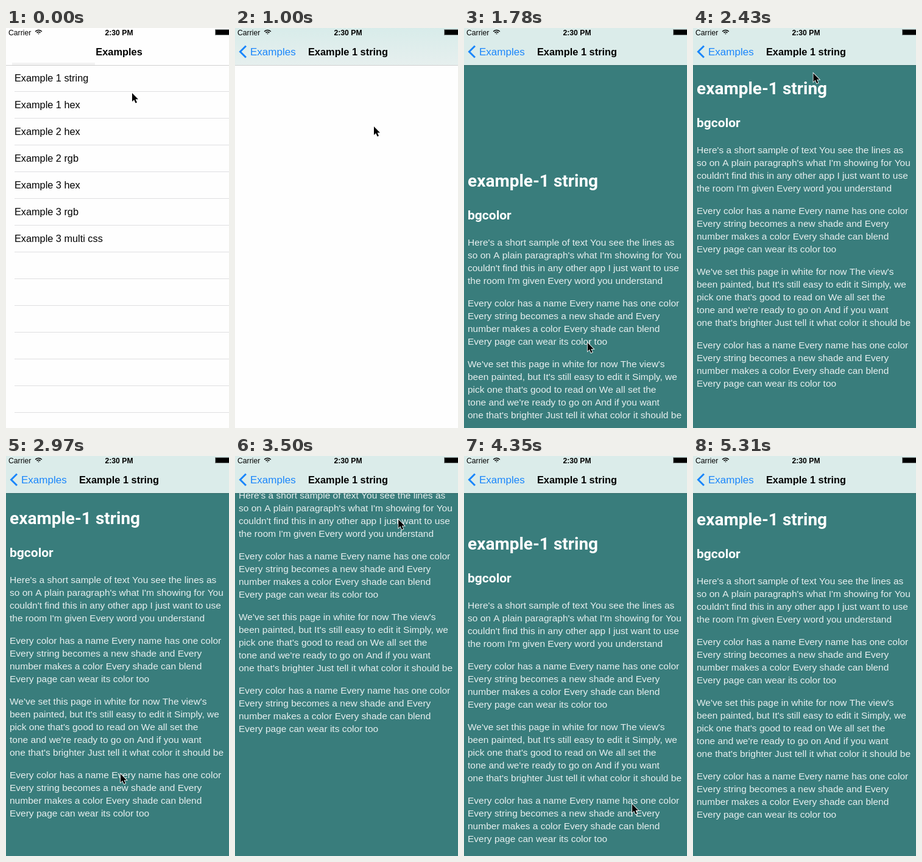
Recreate the animation shown at these times as an HTML page with a canvas. Size 366x658 px, loop 6.98 s.

```html
<!DOCTYPE html>
<html lang="en">
<head>
<meta charset="utf-8">
<title>Examples</title>
<style>
html, body { margin: 0; width: 100%; height: 100%; overflow: hidden; background: #fff; }
canvas { display: block; }
</style>
</head>
<body>
<canvas id="stage" width="366" height="658"></canvas>
<script>
const W = 366, H = 658, NAV = 61, ROW = 44, LOOP = 6980;
const PUSH = 430, PUSHED = 830, LOADED = 1060, RELEASE = 4650, EXIT = 5100;
const ctx = document.getElementById('stage').getContext('2d');
const SANS = '"Liberation Sans", Arial, sans-serif';
const ROBOTO = 'Roboto, "Liberation Sans", sans-serif';
const PAPER = '#fefefe', TEAL = '#397d7c', BLUE = '#1a86fb', MINT = '#dbecea';

const rows = ['Example 1 string', 'Example 1 hex', 'Example 2 hex', 'Example 2 rgb',
  'Example 3 hex', 'Example 3 rgb', 'Example 3 multi css'];

const chorus = ['Every color has a name Every name has one color',
  'Every string becomes a new shade and Every',
  'number makes a color Every shade can blend',
  'Every page can wear its color too'];
const paragraphs = [
  ["Here's a short sample of text You see the lines as",
    "so on A plain paragraph's what I'm showing for You",
    "couldn't find this in any other app I just want to use",
    "the room I'm given Every word you understand"],
  chorus,
  ["We've set this page in white for now The view's",
    "been painted, but It's still easy to edit it Simply, we",
    "pick one that's good to read on We all set the",
    "tone and we're ready to go on And if you want",
    "one that's brighter Just tell it what color it should be"],
  chorus];

const smooth = p => p * p * (3 - 2 * p);
const easeOut = p => 1 - (1 - p) ** 3;
const mix = (a, b, p) => a + (b - a) * p;
const progress = (t, start, end) => Math.max(0, Math.min(1, (t - start) / (end - start)));
const move = (t, start, end, distance, curve = smooth) =>
  distance * curve(progress(t, start, end));

// Two drags down and up, then the page springs back to rest.
function scrollAt(t) {
  return move(t, 1150, 1900, 158) + move(t, 2200, 2500, -188) + move(t, 2500, 2880, 28)
    + move(t, 2970, 3620, -153) + move(t, 3910, 4500, 232)
    + move(t, RELEASE, 5310, -77, easeOut);
}

function pointerAt(t) {
  const x = 207 + move(t, 460, 1000, 21) + move(t, 1150, 1900, -27)
    + move(t, 2200, 2880, -13) + move(t, 2970, 3620, 88);
  const y = 107 + move(t, 50, 230, -13) + move(t, 460, 1000, 68) + move(t, 1000, 1150, -62)
    + move(t, 1150, 1900, 448) + move(t, 2200, 2500, -547) + move(t, 2500, 2880, 522)
    + move(t, 2970, 3620, -459) + move(t, 3910, 4500, 605);
  return [x, y];
}

function rect(x, y, w, h, color) {
  ctx.fillStyle = color;
  ctx.fillRect(x, y, w, h);
}

function text(str, x, y, font, color = '#000', align = 'left', alpha = 1) {
  ctx.globalAlpha = alpha;
  ctx.font = font;
  ctx.fillStyle = color;
  ctx.textAlign = align;
  ctx.fillText(str, x, y);
  ctx.globalAlpha = 1;
}

function widthOf(str, font) {
  ctx.font = font;
  return ctx.measureText(str).width;
}

// Headings use the condensed face where the font offers one.
const hasCondensed = widthOf('example', `condensed 700 32px ${ROBOTO}`)
  < widthOf('example', `700 32px ${ROBOTO}`) - 2;
const heading = (large, small) =>
  hasCondensed ? `condensed 700 ${large}px ${ROBOTO}` : `700 ${small}px ${ROBOTO}`;

function drawList(shift, selected) {
  ctx.save();
  ctx.translate(shift, 0);
  if (selected) rect(0, NAV, W, ROW, '#d9d9d9');
  for (let y = 104; y < H; y += ROW) rect(14, y, W - 14, 1, '#dfdfe1');
  rows.forEach((row, i) => text(row, 14, 88 + ROW * i, `16.3px ${SANS}`));
  ctx.restore();
}

function drawPage(offset) {
  rect(0, NAV, W, H - NAV, TEAL);
  ctx.save();
  ctx.translate(6, Math.round(offset));
  text('example-1 string', 0, 114, heading(32, 28), '#fff');
  text('bgcolor', 0, 168, heading(24, 21), '#fff');
  let y = 211;
  for (const lines of paragraphs) {
    for (const line of lines) {
      text(line, 0, y, `15.5px ${SANS}`, '#fff', 'left', 0.88);
      y += 21;
    }
    y += 16;
  }
  ctx.restore();
}

function drawStatus() {
  text('Carrier', 4, 12, `12.2px ${SANS}`);
  text('2:30 PM', 185.5, 11.5, `bold 12.2px ${SANS}`, '#000', 'center');
  rect(343, 2, W - 343, 10, '#8a9291');
  rect(344, 3, W - 344, 8, '#000');
  ctx.strokeStyle = '#000';
  ctx.lineWidth = 1.6;
  for (let r = 1; r <= 7; r += 3) {
    ctx.beginPath();
    ctx.arc(53.5, 10.5, r, -Math.PI * 0.77, -Math.PI * 0.23);
    ctx.stroke();
  }
}

function drawBar(t, p) {
  rect(0, 0, W, NAV, PAPER);
  if (t >= LOADED) {
    rect(0, 0, W, NAV, MINT);
  } else {
    const tint = ctx.createLinearGradient(0, 0, 0, NAV);
    tint.addColorStop(0, '#d8ecea');
    tint.addColorStop(1, '#e6efee');
    ctx.globalAlpha = p;
    rect(0, 0, W, NAV, tint);
    ctx.globalAlpha = 1;
    if (p === 0) rect(10, 57, 136, 4, '#f2f2f2');
  }
  rect(0, NAV, W, 1, 'rgba(0, 0, 0, 0.18)');
}

function drawTitles(p) {
  const titleFont = `bold 16.4px ${SANS}`;
  if (p < 1) text('Examples', mix(185.5, 62.5, p), 45, titleFont, '#000', 'center', 1 - p);
  if (p === 0) return;
  text('Examples', mix(148, 25, p), 45, `17px ${SANS}`, BLUE, 'left', p);
  text('Example 1 string', mix(330, 185.5, p), 45, titleFont, '#000', 'center', p);
  ctx.globalAlpha = p;
  ctx.strokeStyle = BLUE;
  ctx.lineWidth = 3;
  ctx.beginPath();
  ctx.moveTo(18, 29.5);
  ctx.lineTo(8.5, 39);
  ctx.lineTo(18, 48.5);
  ctx.stroke();
  ctx.globalAlpha = 1;
}

const arrow = new Path2D('M0 0V14L3.2 11L5.6 16.6L8 15.6L5.6 10.2H10Z');
function drawPointer(x, y) {
  ctx.save();
  ctx.translate(x, y);
  ctx.strokeStyle = '#fff';
  ctx.lineWidth = 1.6;
  ctx.stroke(arrow);
  ctx.fillStyle = '#000';
  ctx.fill(arrow);
  ctx.restore();
}

function draw(t) {
  const p = easeOut(progress(t, PUSH, PUSHED));
  rect(0, 0, W, H, PAPER);
  if (t >= LOADED) {
    drawPage(scrollAt(t));
  } else if (p < 1) {
    drawList(-0.3 * W * p, t >= 400);
    if (p > 0) rect(W * (1 - p), NAV, W, H, PAPER);
  }
  drawBar(t, p);
  drawStatus();
  drawTitles(p);
  if (t < EXIT) drawPointer(...pointerAt(t));
}

const start = performance.now();
function tick() {
  draw((performance.now() - start) % LOOP);
  requestAnimationFrame(tick);
}
tick();
</script>
</body>
</html>
```
